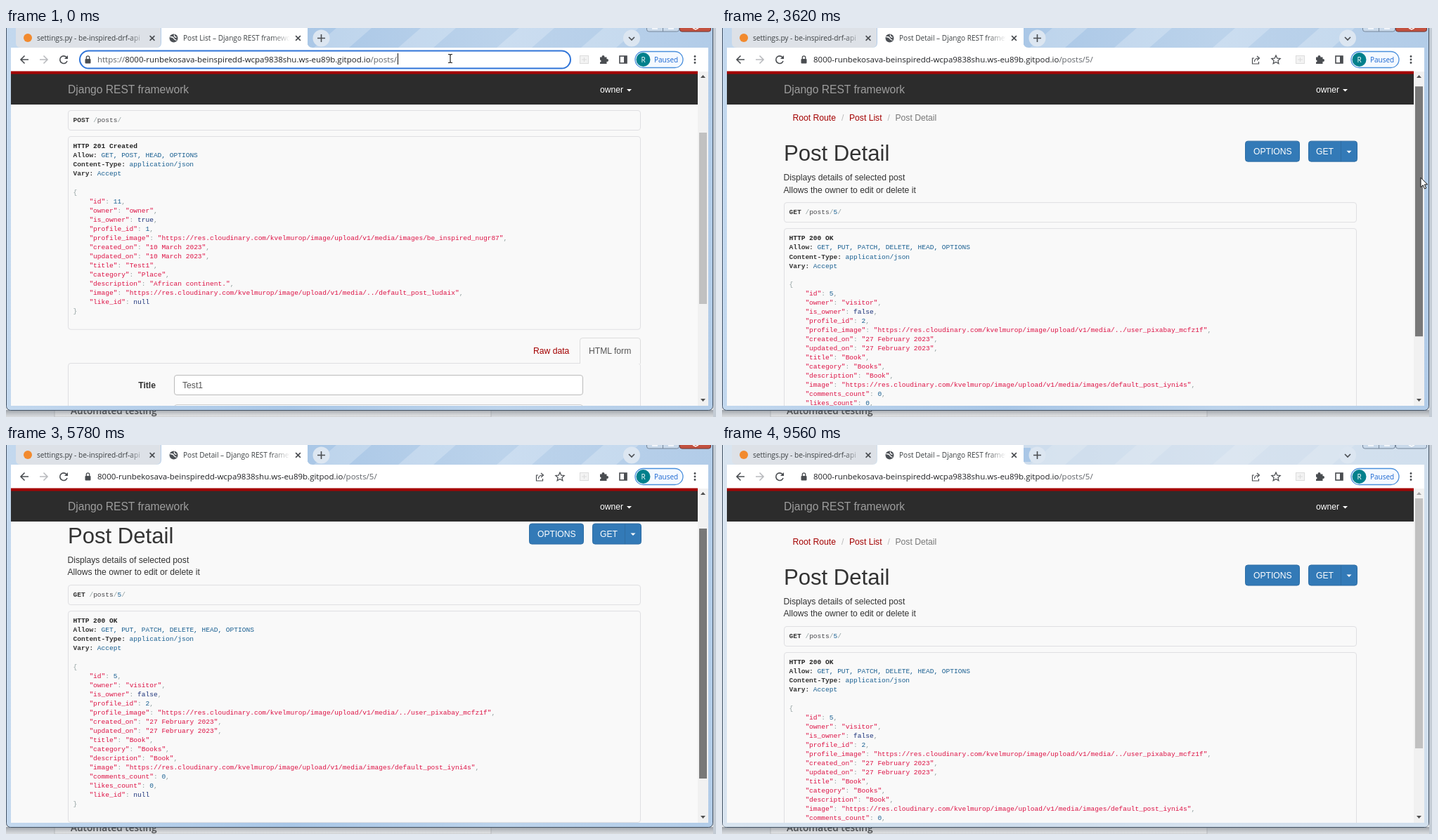
An HTML page for the animation above (9680 ms loop, 1010 by 554 pixels).

```html
<!DOCTYPE html>
<html lang="en">
<head>
<meta charset="utf-8">
<title>Post API walkthrough</title>
<style>
html, body { margin: 0; width: 100%; height: 100%; overflow: hidden; }
svg { display: block; width: 1010px; height: 554px; }
text { white-space: pre; }
.ui { font: 11.5px "Open Sans", "Noto Sans", sans-serif; fill: #202124; }
.tab { font-size: 10.1px; fill: #3c4043; }
.page { font: 12.15px "Liberation Sans", sans-serif; fill: #333; }
.code { font: 9.54px "Liberation Mono", monospace; fill: #48484c; }
.bold { font-weight: bold; }
.link { fill: #a30000; }
.mute { fill: #777; }
.white { fill: #fff; }
.icon { fill: none; stroke: #4a4d51; stroke-width: 1.6; }
</style>
</head>
<body>
<svg id="stage" viewBox="0 0 1010 554"></svg>
<script>
const LOOP = 9680, SCROLL_RATIO = 1.37;
const HOST = "8000-runbekosava-beinspiredd-wcpa9838shu.ws-eu89b.gitpod.io";
const MEDIA = "https://res.cloudinary.com/kvelmurop/image/upload/v1/media/";

const text = (x, y, s, cls, attrs = "") => `<text x="${x}" y="${y}" class="${cls}" ${attrs}>${s}</text>`;
const rect = (x, y, w, h, fill, attrs = "") => `<rect x="${x}" y="${y}" width="${w}" height="${h}" fill="${fill}" ${attrs}/>`;
const path = (d, attrs = 'class="icon"') => `<path d="${d}" ${attrs}/>`;
const circle = (x, y, r, fill, attrs = "") => `<circle cx="${x}" cy="${y}" r="${r}" fill="${fill}" ${attrs}/>`;
const group = (id, body, attrs = "") => `<g id="${id}" ${attrs}>${body}</g>`;
const span = (fill, s, cls = "") => `<tspan fill="${fill}" style="fill:${fill}" class="${cls}">${s}</tspan>`;
const cross = (x, y, r) => path(`M${x - r} ${y - r}l${2 * r} ${2 * r}m0 ${-2 * r}l${-2 * r} ${2 * r}`);
const panel = (x, y, w, h, fill = "#f9f9f9", stroke = "#dfdfe2") =>
  rect(x + .5, y + .5, w, h, fill, `stroke="${stroke}" rx="3.5"`);

const tokenColor = s => s[0] == '"' ? "#d14" : /\d/.test(s) ? "#195f91" : /\w/.test(s) ? "#1e347b" : "#93a1a1";
const highlight = s => s.replace(/"[^"]*"|true|false|null|\d+|[{}:,\/]/g, m => span(tokenColor(m), m));
const header = s => s.replace(/^([\w-]+:)(.*)/, (_, k, v) => span("#333", k, "bold") + span("#195f91", v));

function request(y, method, url) {
  return panel(88, y, 814, 28) + text(95.5, y + 17, span("#333", method, "bold") + " " + highlight(url), "code");
}
function response(y, status, allow, fields) {
  const lines = [
    span("#222", "HTTP " + status, "bold"),
    ...["Allow: " + allow, "Content-Type: application/json", "Vary: Accept"].map(header),
    "",
    ...["{", ...fields.map(([k, v], i) => `    "${k}": ${v}${i < fields.length - 1 ? "," : ""}`), "}"].map(highlight)
  ];
  return panel(88, y, 814, lines.length * 13.04 + 27) +
    lines.map((s, i) => text(95.5, y + 17.3 + i * 13.04, s, "code")).join("");
}

const listPage = request(117, "POST", "/posts/") +
  response(154, "201 Created", "GET, POST, HEAD, OPTIONS", [
    ["id", 11], ["owner", '"owner"'], ["is_owner", true], ["profile_id", 1],
    ["profile_image", `"${MEDIA}images/be_inspired_nugr87"`],
    ["created_on", '"10 March 2023"'], ["updated_on", '"10 March 2023"'],
    ["title", '"Test1"'], ["category", '"Place"'], ["description", '"African continent."'],
    ["image", `"${MEDIA}../default_post_ludaix"`], ["like_id", null]
  ]) +
  text(750, 464, "Raw data", "page link") +
  panel(88, 477, 814, 90) +
  path("M816.5 478V445q0-3.5 3.5-3.5H899q3.5 0 3.5 3.5V478", 'fill="#f9f9f9" stroke="#ddd"') +
  text(829, 464, "HTML form", "page", 'style="fill:#555"') +
  text(213, 513, "Title", "page bold", 'text-anchor="end"') +
  panel(239, 494, 581, 28, "#fff", "#bbb") + panel(239, 536, 581, 28, "#fff", "#ccc") +
  text(251, 513, "Test1", "page", 'style="fill:#555"');

const button = (x, w) => rect(x + .5, 171, w, 29, "#337ab7", 'stroke="#2e6da4" rx="3.5"');
const detailPage =
  text(100.5, 142, "Root Route", "page link") + text(170, 142, "/", "page", 'style="fill:#bbb"') +
  text(181, 142, "Post List", "page link") + text(235.5, 142, "/", "page", 'style="fill:#bbb"') +
  text(246.5, 142, "Post Detail", "page mute") +
  text(88, 199, "Post Detail", "page", 'style="font-size:31.1px"') +
  button(744, 77) + button(834, 69) + rect(880, 171, 1, 29, "#2e6da4") +
  text(756, 190, "OPTIONS", "page white") + text(845, 190, "GET", "page white") +
  path("M888.5 184.5h7l-3.5 3.5z", 'fill="#fff"') +
  text(87.5, 227, "Displays details of selected post", "page") +
  text(87.5, 244.4, "Allows the owner to edit or delete it", "page") +
  request(258, "GET", "/posts/5/") +
  response(295, "200 OK", "GET, PUT, PATCH, DELETE, HEAD, OPTIONS", [
    ["id", 5], ["owner", '"visitor"'], ["is_owner", false], ["profile_id", 2],
    ["profile_image", `"${MEDIA}../user_pixabay_mcfz1f"`],
    ["created_on", '"27 February 2023"'], ["updated_on", '"27 February 2023"'],
    ["title", '"Book"'], ["category", '"Books"'], ["description", '"Book"'],
    ["image", `"${MEDIA}images/default_post_iyni4s"`],
    ["comments_count", 0], ["likes_count", 0], ["like_id", null]
  ]);

const globe = (x, y) => circle(x, y, 6, "#4d5156") +
  path(`M${x - 5} ${y - 2}q4 0 5 2t4 3M${x + 1} ${y - 5}q-1 3 3 4`, 'fill="none" stroke="#fff" stroke-width="1.3"');

const desktop = rect(0, 0, 1010, 554, "#e6e8ea") + rect(69, 538, 621, 16, "#f4f4f4", 'stroke="#c4c6c8"') +
  text(92, 550, "Automated testing", "ui", 'style="font-size:13.6px;font-weight:600;fill:#333"') +
  rect(0, 544, 1010, 10, "url(#shade)") + rect(1006, 0, 4, 554, "#c3cbd4");

const frame = rect(.5, -9.5, 1005, 554, "url(#glass)", 'stroke="#445364" rx="6"') +
  [470, 590, 730, 850].map(x => path(`M${x} 0h50l-32 28h-50z`, 'fill="#fff" opacity=".22"')).join("") +
  group("inactive", rect(1, 0, 1004, 544, "#eceff2", 'opacity=".55"')) +
  rect(911.5, -5, 46, 10, "#c9d9ea", 'stroke="#75869a" rx="3"') + rect(934, 0, 1, 5, "#75869a") +
  rect(958.5, -5, 44, 10, "#c9d9ea", 'stroke="#75869a" rx="3"') +
  group("close", rect(958.5, -5, 44, 10, "#c2513f", 'stroke="#7c3a35" rx="3"')) +
  path("M919 1h8M942 1h8M977 0l4 2 4-2", 'fill="none" stroke="#fff" stroke-width="1.5"');

const tabs = path("M14 0H220V21q0 7-7 7H21q-7 0-7-7z", 'fill="#dde1e7"') +
  circle(31, 14, 6, "#f28a2e") + text(44, 18, "settings.py - be-inspired-drf-api", "ui tab") +
  rect(174, 4, 24, 20, "url(#fadeGray)") + cross(208, 14.5, 3.4) +
  path("M214 28q7 0 7-7V0H429V21q0 7 7 7z", 'fill="#fff"') +
  group("favicon", globe(238.5, 14.5)) + `<text id="title" x="252" y="18" class="ui tab"></text>` +
  rect(378, 4, 26, 20, "url(#fadeWhite)") + rect(404, 2, 25, 24, "#fff") + rect(429, 4, 10, 20, "url(#glass)") +
  cross(415.5, 14.5, 3.4) +
  circle(448.5, 14.5, 12, "#dce6f1") + path("M443 14.5h11m-5.5-5.5v11") +
  circle(890, 14.5, 12, "#dce6f1") + path("M886 13l4 4 4-4");

const toolbar = rect(7, 28, 992, 34, "#fff") +
  path("M32 45H21m5.5-5.5L21 45l5.5 5.5") +
  path("M48 45h11m-5.5-5.5L59 45l-5.5 5.5", 'class="icon" style="stroke:#b9bbbe"') +
  group("reload", path("M86.3 42A5.3 5.3 0 1 0 87 47") + path("M88 39v5h-5z", 'fill="#4a4d51"')) +
  group("stop", cross(82, 45, 4.6)) +
  path("M757 43h-2.500v8h9v-3M757.500 48q0-5 6-5m-2.500-3l3.500 3-3.500 3", 'class="icon" style="stroke-width:1.2"') +
  path("M788 39l1.800 4.100 4.400.4-3.300 3 1 4.300-3.900-2.300-3.900 2.300 1-4.300-3.300-3 4.400-.4z", 'class="icon" style="stroke-width:1.2"') +
  rect(816.5, 39.5, 12, 11, "#f3f3f3", 'stroke="#dcdcdc"') + path("M819 45h7m-3.500-3v6", 'stroke="#dcdcdc"') +
  rect(845, 41.5, 9.5, 9.5, "#4a4d51") + circle(849.5, 41, 2, "#4a4d51") + circle(855, 46, 2, "#4a4d51") + circle(845, 47, 1.6, "#fff") +
  rect(873, 40, 10, 10, "none", 'class="icon"') + rect(879, 40, 4, 10, "#4a4d51") +
  rect(895, 33.5, 68, 23, "#f4f9ff", 'rx="11.5" stroke="#4a8fdc" stroke-width="1.3"') +
  circle(906.5, 45, 10, "#00808c") + text(906.5, 48.7, "R", "ui white", 'text-anchor="middle" style="font-size:10px"') +
  text(922, 48.7, "Paused", "ui", 'style="font-size:10px;fill:#1a67d2"') +
  [40.5, 45, 49.5].map(y => circle(980, y, 1.4, "#4a4d51")).join("");

const navbar = rect(7, 62, 977, 47, "#2c2c2c") + rect(7, 61.5, 977, 4, "#a30000") +
  text(88, 93, "Django REST framework", "page", 'style="font-size:15.6px;fill:#9d9d9d"') +
  text(845, 92, "owner", "page white") + path("M883 87h7l-3.500 3.500z", 'fill="#fff"');

const scrollbar = rect(984, 62, 15, 476, "#f1f1f1") + path("M988 71h7l-3.500-4z", 'id="up"') +
  path("M988 528h7l-3.500 4z", 'id="down"') + rect(986, 76, 11, 356, "#c1c1c1", 'id="thumb"');

const popup = rect(98, 36, 709, 103, "#000", 'rx="8" opacity=".13"') + rect(95, 34, 715, 102, "#000", 'rx="8" opacity=".07"') +
  rect(96, 30, 713, 104, "#fff", 'rx="8"') +
  rect(96, 62, 713, 32, "#e6e6e8") + rect(96, 62, 3, 32, "#1a62d0") + globe(116.5, 77.5) +
  text(140, 81, `https://${HOST}/posts/5`, "ui bold", 'style="fill:#2548ae"') +
  circle(115.5, 109, 3.6, "none", 'class="icon" style="stroke-width:1.3"') + path("M118 112l4 4", 'class="icon" style="stroke-width:1.3"') +
  text(139.5, 114.5, `https://${HOST}/posts/5${span("#6b6f74", " - Velmor Search")}`, "ui");

const address = rect(105, 32.5, 698, 25, "#fff", 'id="ring" rx="12.5" stroke="#2f74d8" stroke-width="2"') +
  group("popup", popup) +
  group("lock", rect(112.5, 44, 8, 6.5, "#4a4d51", 'rx="1"') + path("M114.300 44v-2a2.200 2.200 0 0 1 4.400 0v2", 'class="icon" style="stroke-width:1.3"')) +
  group("info", circle(116.5, 45, 5.3, "none", 'class="icon" style="stroke-width:1.3"') + path("M116.500 44.300v3.700m0-6v1.400")) +
  `<text id="url" x="130" y="49" class="ui"></text>` + rect(0, 36, 1, 16, "#111", 'id="caret"');

const stage = document.getElementById("stage");
const gradient = (id, dir, stops) => `<linearGradient id="${id}" ${dir}>` +
  stops.map(([o, c, a = 1]) => `<stop offset="${o}" stop-color="${c}" stop-opacity="${a}"/>`).join("") + "</linearGradient>";
stage.innerHTML = "<defs>" +
  gradient("glass", 'gradientUnits="userSpaceOnUse" x2="1010"', [[0, "#c3d8ee"], [.4, "#a8c6e6"], [.7, "#bcd3eb"], [1, "#b2cce8"]]) +
  gradient("shade", 'x2="0" y2="1"', [[0, "#5d6570", .55], [1, "#8d949c", .15]]) +
  gradient("fadeGray", "", [[0, "#dde1e7", 0], [1, "#dde1e7"]]) +
  gradient("fadeWhite", "", [[0, "#fff", 0], [1, "#fff"]]) +
  `<clipPath id="view">${rect(7, 62, 977, 476, "#000")}</clipPath></defs>` +
  desktop + frame + tabs + toolbar + rect(7, 62, 992, 476, "#f9f9f9") +
  `<g clip-path="url(#view)">${group("list", listPage)}${group("detail", detailPage)}</g>` +
  navbar + scrollbar + address +
  group("beam", path("M629 37.500h2l1 1 1-1h2M632 38.500v10M629 49.500h2l1-1 1 1h2", 'fill="none" stroke="#222" stroke-width="1.2"')) +
  group("arrow", path("M0 0V13.500l3.200-3 2.300 5.300 2.200-1-2.300-5.100H9.600z", 'fill="#fff" stroke="#111"'));

const el = {};
stage.querySelectorAll("[id]").forEach(e => el[e.id] = e);

// Tracks hold each value until the next time.
const thumbTrack = [
  [0, 0], [3540, 3], [3620, 7.2], [3680, 14], [3750, 22], [3820, 30], [3890, 39], [3950, 48], [4000, 57], [4060, 64.6],
  [4130, 73], [4200, 76], [4290, 79], [4490, 82], [4550, 85], [4620, 87.5], [4690, 89],
  [5470, 85], [5550, 76], [5630, 66], [5710, 55], [5780, 43], [5880, 37],
  [6060, 31], [6120, 25], [6180, 19], [6240, 13], [6300, 8], [7050, 6.5], [7110, 3], [7170, 0]
];
const mouseTrack = [
  [0, -50, 0], [2450, 760, 112], [2510, 872, 180], [2580, 912, 206],
  [2890, 918, 206], [2950, 932, 206], [3010, 950, 206], [3080, 968, 206], [3140, 984, 206], [3200, 994, 206],
  [4860, 1020, 295], [7780, 1002, 167], [7840, 978, 177], [7900, 950, 188], [7960, 925, 197], [8020, 909, 202],
  [8390, 916, 240], [8450, 930, 320], [8510, 945, 425], [8570, 952, 486], [8750, 956, 496], [8810, 959, 502], [9560, -50, 0]
];
const at = (track, t) => track.findLast(k => k[0] <= t);
const show = (id, on) => el[id].style.display = on ? "" : "none";
const set = (id, attrs) => { for (const k in attrs) el[id].setAttribute(k, attrs[k]); };
function write(id, html) {
  if (el[id].shown !== html) el[id].innerHTML = el[id].shown = html;
}

function draw() {
  const t = performance.now() % LOOP;
  const loaded = t >= 1480, typed = t >= 490, editing = t < 1290, loading = t >= 1290 && t < 1550;
  const redirected = t >= 1420, inactive = t >= 9560;

  show("list", !loaded);
  show("detail", loaded);
  show("favicon", !loading);
  show("stop", loading);
  show("reload", !loading);
  show("inactive", inactive);
  show("close", !inactive);
  write("title", `Post ${loaded ? "Detail" : "List"} – Django REST framework`);

  show("ring", !typed);
  show("popup", typed && t < 1350);
  el.popup.style.opacity = t < 1290 ? 1 : .87;
  show("info", typed && !redirected);
  show("lock", !typed || redirected);
  const grey = s => span("#5f6368", s);
  write("url", (editing ? grey("https://") : "") + HOST + grey("/posts/" + (redirected ? "5/" : typed ? "5" : "")));
  show("caret", t < 1010);
  set("caret", { x: typed ? 573 : 557 });

  // The page paints one step behind the thumb late in the downward drag.
  const thumb = at(thumbTrack, t)[1];
  const painted = at(thumbTrack, t > 4000 && t < 4290 ? t - 70 : t)[1];
  set("detail", { transform: `translate(0 ${-painted * SCROLL_RATIO})` });
  set("thumb", {
    y: loaded ? 76 + thumb : 149, height: loaded ? 356 : 244,
    fill: t < 3140 || t >= 7410 ? "#c1c1c1" : t < 3460 ? "#a8a8a8" : "#787878"
  });
  set("up", { fill: loaded && thumb == 0 ? "#a3a3a3" : "#505050" });
  set("down", { fill: thumb == 89 ? "#a3a3a3" : "#505050" });

  let [, x, y] = at(mouseTrack, t);
  if (t >= 3460 && t < 4860) {
    x = 994 + 15 * Math.min(1, Math.max(0, (t - 3680) / 450));
    y += painted;
  }
  show("beam", t < 2450);
  set("arrow", { transform: `translate(${x} ${y})` });
  requestAnimationFrame(draw);
}
draw();
</script>
</body>
</html>
```
